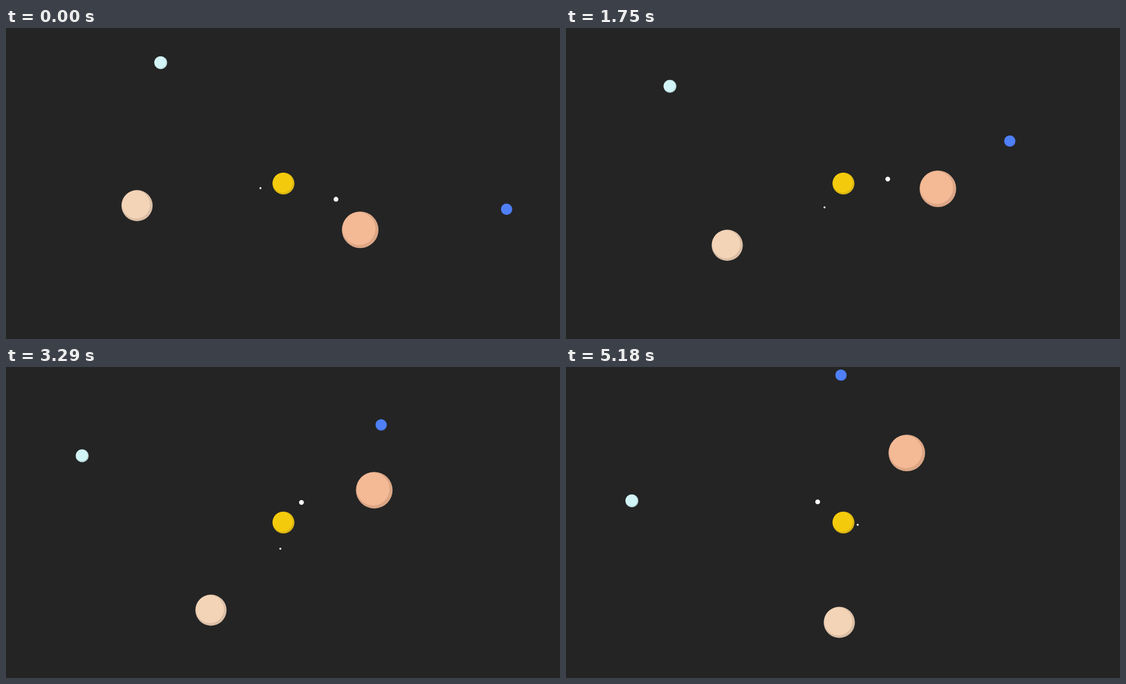
Animation of 998 by 561 pixels, one loop 5250 ms. Source, as an HTML page with a canvas:

```html
<!DOCTYPE html>
<html lang="en">
<head>
<meta charset="utf-8">
<title>Orbits</title>
<style>
html, body { margin: 0; width: 100%; height: 100%; overflow: hidden; background: #242424; }
canvas { display: block; }
</style>
</head>
<body>
<canvas id="stage" width="998" height="561"></canvas>
<script>
const ctx = document.getElementById('stage').getContext('2d');
const LOOP = 5250, FRAME = 70, LEAD = 15;   // ms
const DT = 0.005;                           // s per physics step
const PULL = 13.93, NEAR = 45;              // px/s², px

const sun = { r: 19.8, lit: '#f4cb0c', shade: '#dbb611' };

// Start position (from the sun) and velocity in px/s.
const bodies = [
  { pos: [-41.3, 8], vel: [-6.97, 25.36], r: 1.8, lit: '#fff' },
  { pos: [94.6, 28.7], vel: [3.69, -18.6], r: 4.3, lit: '#fff' },
  { pos: [402.7, 47.5], vel: [-46.1, -70.1], r: 10.2, lit: '#4f80f8', shade: '#4a7af2' },
  { pos: [-220.2, -218.2], vel: [-61.84, 16.5], r: 11.6, lit: '#d3f4f6', shade: '#bbdcdd' },
  { pos: [-264, 39.2], vel: [19.1, 43.97], r: 28.1, lit: '#f3d4b7', shade: '#dabea5' },
  { pos: [137.8, 84.1], vel: [29.66, -37.76], r: 33, lit: '#f4b995', shade: '#dba686' }
];

// Gravity is inverse-square close to the sun and constant further out.
function place({ pos: [x, y], vel: [vx, vy] }, seconds) {
  const steps = Math.round(seconds / DT);
  for (let i = 0; i < steps; i++) {
    x += vx * DT / 2;
    y += vy * DT / 2;
    const d = Math.hypot(x, y);
    const k = PULL * (NEAR / Math.min(d, NEAR)) ** 2 / d * DT;
    vx -= k * x;
    vy -= k * y;
    x += vx * DT / 2;
    y += vy * DT / 2;
  }
  return [x, y];
}

function disc(x, y, r, color) {
  ctx.fillStyle = color;
  ctx.beginPath();
  ctx.arc(x, y, r, 0, Math.PI * 2);
  ctx.fill();
}

function ball(x, y, { r, lit, shade }) {
  disc(x, y, r, shade || lit);
  if (shade) disc(x - r * 0.065, y - r * 0.065, r * 0.9, lit);
}

function draw(ms) {
  ctx.setTransform(1, 0, 0, 1, 0, 0);
  ctx.fillStyle = '#242424';
  ctx.fillRect(0, 0, 998, 561);
  ctx.translate(499.8, 280.5);
  ball(0, 0, sun);
  for (const b of bodies) ball(...place(b, (ms + LEAD) / 1000), b);
}

const start = performance.now();
function tick() {
  const t = (performance.now() - start) % LOOP;
  draw(Math.floor(t / FRAME) * FRAME);
  requestAnimationFrame(tick);
}
tick();
</script>
</body>
</html>
```
